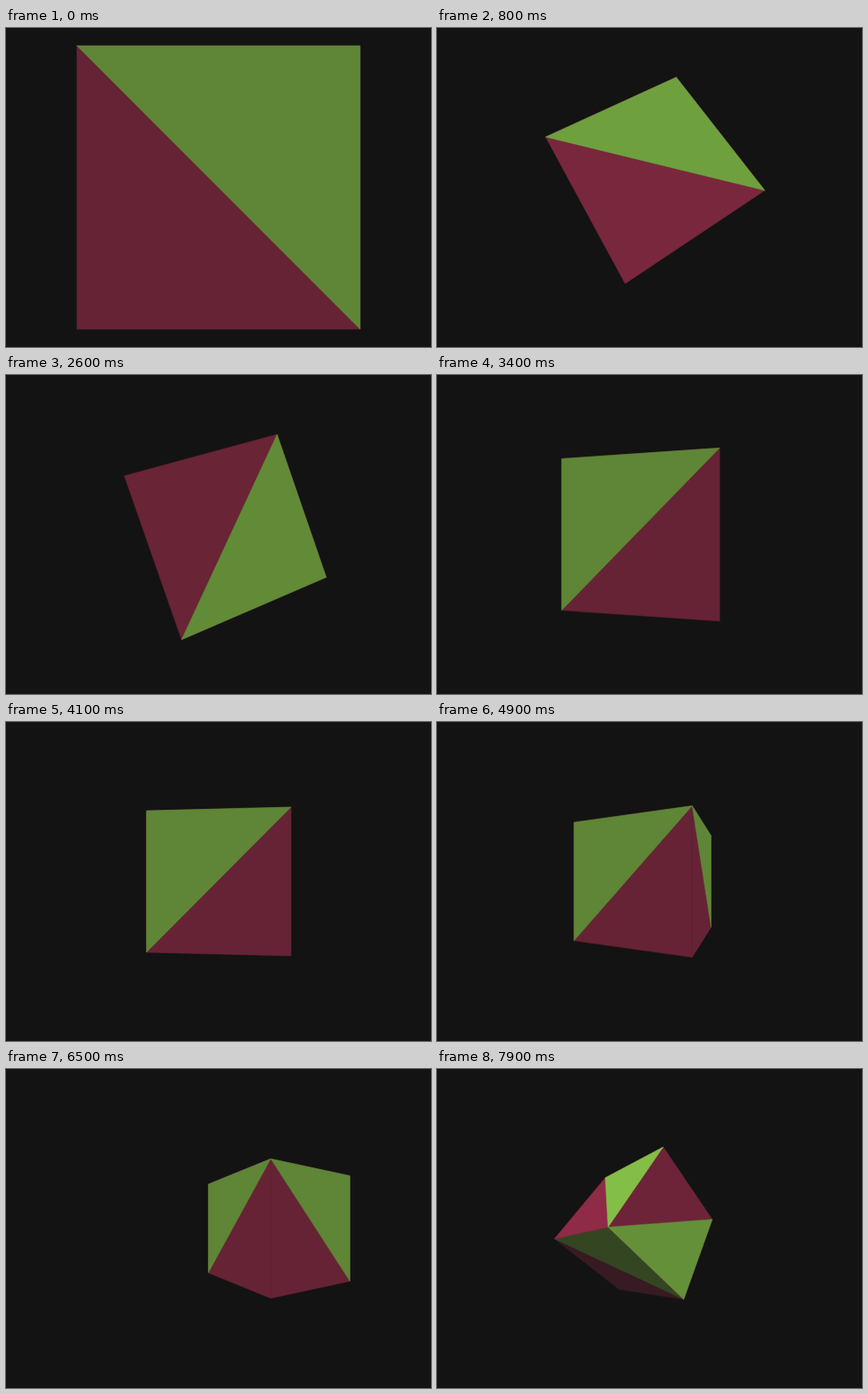
Animation, 480 px wide and 360 px high, one loop 8000 ms. Source, as an HTML page with a canvas:

```html
<!DOCTYPE html>
<html>
<head>
<meta charset="utf-8">
<style>
html, body { margin: 0; width: 100%; height: 100%; overflow: hidden; background: #131313; }
canvas { display: block; }
</style>
</head>
<body>
<canvas id="stage" width="480" height="360"></canvas>
<script>
const ctx = document.getElementById('stage').getContext('2d');
const LOOP = 8000, STEP = 100, FOCAL = 240, BACK = 19;
const GREEN = [94, 134, 54], RED = [102, 35, 53];
const { PI, sin, cos, min, max } = Math;

// Corner numbers: bit 0 = right, bit 1 = bottom, bit 2 = back.
// Each face: green tip, diagonal end, red tip, other diagonal end.
const FACES = ['0132', '5731', '1540', '4026', '5467', '3267'];

const clamp = u => max(0, min(1, u));
const smooth = u => u * u * (3 - 2 * u);

// A lone square rolls and wobbles for the first 3.4 s.
function squarePose(s) {
  return {
    yaw: 10 * cos(2 * PI * (s - 3.4) / 1.6) * min(1, s / 1.4),
    pitch: 30 * sin(PI * min(1, s / 2.9)) ** 2,
    roll: 90 - 450 * (1 - cos(PI / 2 * clamp(s / 3.39))),
    depth: 2.5 + 1.115 * smooth(clamp(s / 0.7)),
    shift: 0
  };
}

// Then a cube spins, sways and recedes, and finally tumbles.
function cubePose(s) {
  const u = s - 3.4, tumble = clamp((s - 6.5) / 1.4) ** 3;
  const sway = 118 * sin(2 * PI * u / 1.47) * (1 - tumble);
  return {
    yaw: 10.3 + 248.5 * u - 10 * tumble,
    pitch: -48.5 * tumble,
    roll: 80 * tumble,
    depth: 3.615 + 0.391 * u ** 0.63,
    shift: (sway - 13) * min(1, u)
  };
}

function turn(a, b, degrees) {
  const r = degrees * PI / 180, c = cos(r), s = sin(r);
  return [a * c - b * s, a * s + b * c];
}

function rotate([x, y, z], { yaw, pitch, roll }) {
  [x, y] = turn(x, y, roll);
  [z, y] = turn(z, y, pitch);
  [z, x] = turn(z, x, yaw);
  return [x, y, z];
}

function fill(points, color, light) {
  const shade = color.map(c => Math.round(BACK + (c - BACK) * light));
  ctx.fillStyle = ctx.strokeStyle = `rgb(${shade})`;
  ctx.beginPath();
  points.forEach(p => ctx.lineTo(...p));
  ctx.closePath();
  ctx.fill();
  ctx.stroke(); // closes the hairline between neighbours
}

function draw(s) {
  const solid = s > 3.4;
  const pose = solid ? cubePose(s) : squarePose(s);
  const depth = pose.depth, side = pose.shift / FOCAL * depth;
  const corners = [...Array(8).keys()].map(i =>
    rotate([i & 1 ? 1 : -1, i & 2 ? 1 : -1, i & 4 ? 1 : -1], pose));
  const project = ([x, y, z]) => {
    const scale = FOCAL / (z + depth);
    return [240 + (x + side) * scale, 180 + y * scale];
  };

  ctx.fillStyle = `rgb(${BACK}, ${BACK}, ${BACK})`;
  ctx.fillRect(0, 0, 480, 360);
  ctx.lineWidth = 0.5;
  ctx.lineJoin = 'round';
  for (const face of solid ? FACES : FACES.slice(0, 1)) {
    const quad = [...face].map(i => corners[i]);
    const normal = [0, 1, 2].map(k => (quad[0][k] + quad[2][k]) / 2);
    if (normal[0] * side + normal[2] * depth + 1 >= 0) continue;
    const [tip, a, foot, b] = quad.map(project);
    const light = 1 - 0.75 * normal[1]; // lit from above
    fill([tip, a, foot, b], RED, light);
    fill([tip, a, b], GREEN, light);
  }
}

const start = performance.now();
function tick() {
  const t = (performance.now() - start) % LOOP;
  draw(Math.floor(t / STEP) * STEP / 1000);
  requestAnimationFrame(tick);
}
tick();
</script>
</body>
</html>
```
